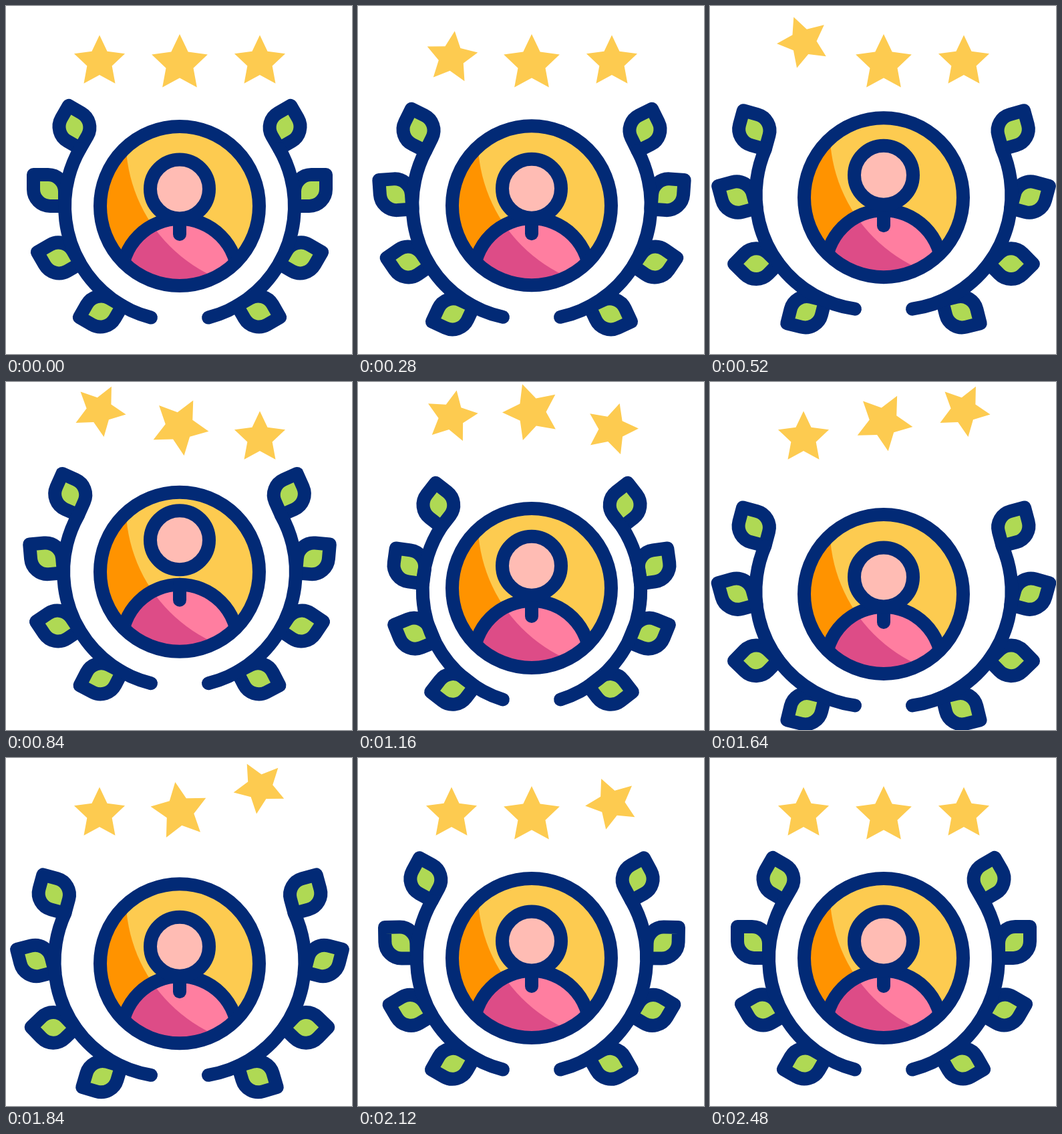
An HTML page with a canvas for the animation above (2.52 s loop, 518 px wide and 520 px high).

```html
<!DOCTYPE html>
<html>
<head>
<meta charset="utf-8">
<style>
  html, body { margin: 0; width: 100%; height: 100%; overflow: hidden; background: #fff; }
  canvas { display: block; }
</style>
</head>
<body>
<canvas width="518" height="520"></canvas>
<script>
const ctx = document.querySelector('canvas').getContext('2d');
const LOOP = 2520, TAU = Math.PI * 2, DEG = Math.PI / 180;
const NAVY = '#022a76', YELLOW = '#fdcb50', ORANGE = '#ff9300', PINK = '#ff7ea0',
      MAGENTA = '#dd4c87', SKIN = '#ffbcb4', GREEN = '#afd954';

const progress = (t, start, end) => Math.min(1, Math.max(0, (t - start) / (end - start)));
const sine = (t, start, end) => (1 - Math.cos(Math.PI * progress(t, start, end))) / 2;
const quad = (t, start, end) => {
  const u = progress(t, start, end);
  return u < 0.5 ? 2 * u * u : 1 - 2 * (1 - u) ** 2;
};

// Badge and laurel rise, drop below rest and settle.
const bob = t => -18.5 * sine(t, 220, 700) + 37.5 * sine(t, 710, 1400) - 19 * sine(t, 1560, 2080);
// The head hops on its own.
const nod = t => 22 * (sine(t, 840, 1380) - sine(t, 300, 840));
// Degrees the branches open outwards: open, squeeze, open, rest.
const bend = t => 7 * sine(t, 80, 600) - 10.3 * sine(t, 600, 1020)
  + 10.1 * sine(t, 1100, 1680) - 6.8 * sine(t, 1700, 2150);
const sway = (i, t) => 1.45 * bend(t - 20 * (4 - i));
const hop = t => 41 * (sine(t, 970, 1580) - sine(t, 126, 734));
const spin = t => 360 * quad(t, 140, 1580);

const stars = [
  { x: 140, y: 83.5, r: 40, delay: 0 },
  { x: 260, y: 86, r: 44, delay: 420 },
  { x: 380, y: 83.5, r: 40, delay: 800 }
];

function group(draw) {
  ctx.save();
  draw();
  ctx.restore();
}

function disc(x, y, r, fill) {
  ctx.beginPath();
  ctx.arc(x, y, r, 0, TAU);
  if (fill) {
    ctx.fillStyle = fill;
    ctx.fill();
  }
}

function rotateAbout(x, y, degrees) {
  ctx.translate(x, y);
  ctx.rotate(degrees * DEG);
  ctx.translate(-x, -y);
}

function drawStar({ x, y, r, delay }, t) {
  group(() => {
    ctx.translate(x, y + hop(t - delay));
    ctx.rotate(spin(t - delay) * DEG);
    ctx.beginPath();
    for (let i = 0; i < 10; i++) {
      const radius = i % 2 ? r * 0.49 : r, a = i * 36 * DEG;
      ctx.lineTo(radius * Math.sin(a), -radius * Math.cos(a));
    }
    ctx.fillStyle = YELLOW;
    ctx.fill();
  });
}

// A square with two opposite corners rounded; its base sits on the stem.
function drawLeaf(i, t) {
  group(() => {
    rotateAbout(260, 299, 30 - 30 * i);
    ctx.translate(88, 299);
    ctx.rotate(-sway(i, t) * DEG);
    ctx.beginPath();
    ctx.moveTo(-47, -47);
    ctx.arcTo(0, -47, 0, 0, 25);
    ctx.lineTo(0, 0);
    ctx.arcTo(-47, 0, -47, -47, 25);
    ctx.closePath();
    ctx.fillStyle = GREEN;
    ctx.fill();
    ctx.stroke();
  });
}

function drawBranch(t) {
  rotateAbout(217, 465, -bend(t));
  for (let i = 0; i < 4; i++) drawLeaf(i, t);
  ctx.beginPath();
  ctx.arc(260, 299, 172, 104.5 * DEG, 210 * DEG);
  ctx.stroke();
}

function shade(dark, light) {
  disc(260, 299, 119, dark);
  disc(404, 200, 224.6, light);
}

function drawBadge(t) {
  group(() => {
    disc(260, 299, 119);
    ctx.clip();
    shade(ORANGE, YELLOW);
    group(() => {
      disc(260, 405, 87);
      ctx.clip();
      shade(MAGENTA, PINK);
    });
    disc(260, 405, 87);
    ctx.stroke();
    ctx.beginPath();
    ctx.moveTo(260, 318);
    ctx.lineTo(260, 341);
    ctx.stroke();
  });
  disc(260, 299, 119);
  ctx.stroke();
  disc(260, 273.5 + nod(t), 44, SKIN);
  ctx.stroke();
}

function frame() {
  const t = performance.now() % LOOP;
  ctx.fillStyle = '#fff';
  ctx.fillRect(0, 0, 518, 520);
  ctx.strokeStyle = NAVY;
  ctx.lineWidth = 20;
  ctx.lineCap = ctx.lineJoin = 'round';
  stars.forEach(star => drawStar(star, t));
  group(() => {
    ctx.translate(0, bob(t));
    group(() => drawBranch(t));
    group(() => {
      ctx.translate(520, 0);
      ctx.scale(-1, 1);
      drawBranch(t);
    });
    drawBadge(t);
  });
  requestAnimationFrame(frame);
}
frame();
</script>
</body>
</html>
```
